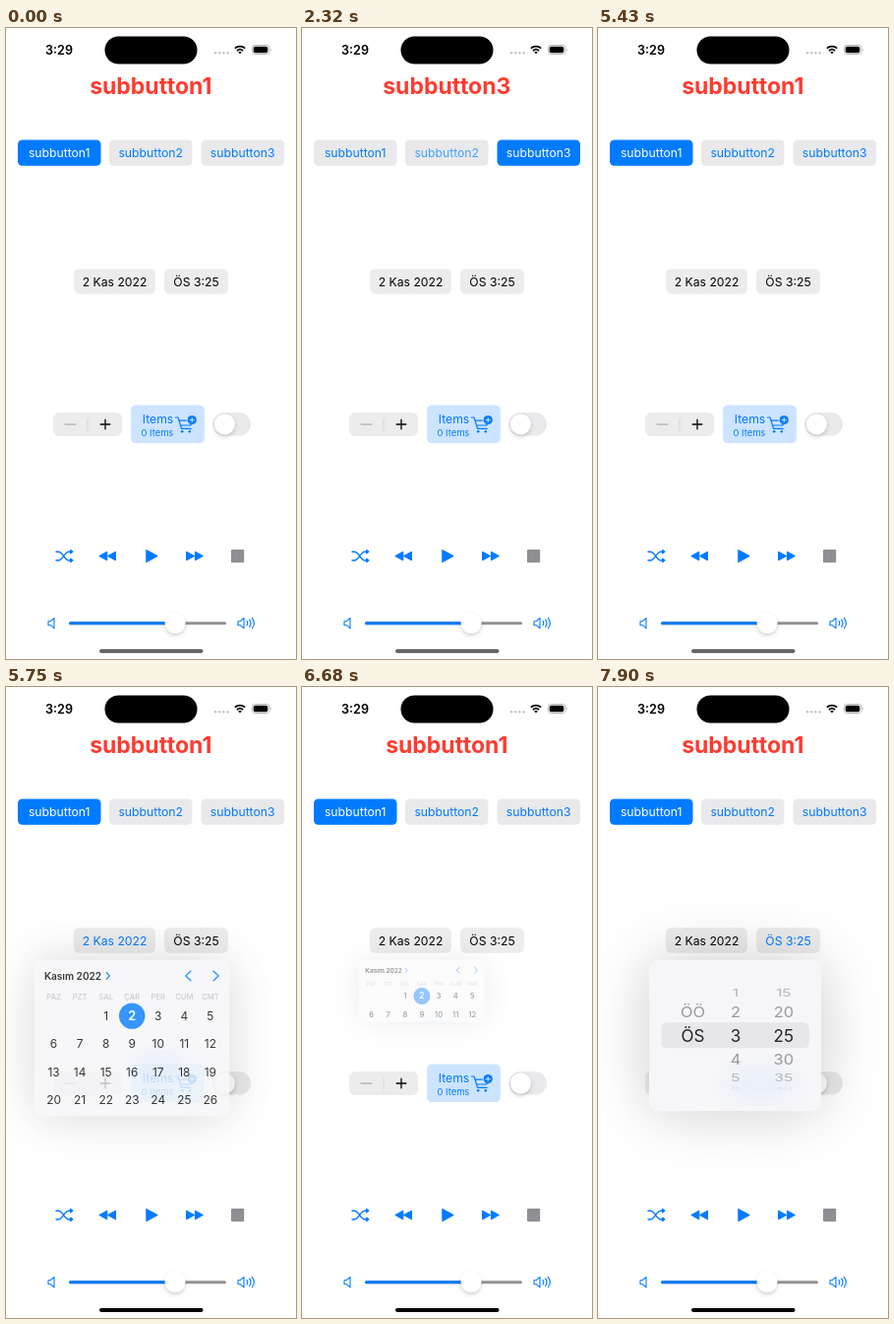
An HTML page for the animation above (8 s loop, 295x640 px).

```html
<!DOCTYPE html>
<html lang="tr">
<head>
<meta charset="utf-8">
<title>Controls</title>
<style>
html, body { margin: 0; width: 100%; height: 100%; overflow: hidden; background: #fff; }
svg { display: block; width: 100vw; height: 100vh; font-family: Inter, Roboto, sans-serif; }
</style>
</head>
<body>
<svg id="stage" viewBox="0 0 295 640"></svg>
<script>
const BLUE = '#007aff', GREY = '#e9e9eb', PILL = '#ececed', MID = '#8e8e93';
const stage = document.getElementById('stage');

// Markup helpers
const text = (x, cy, size, str, fill = '#000', weight = 400, anchor = 'middle', extra = '') =>
  `<text x="${x}" y="${(cy + size * 0.364).toFixed(2)}" font-size="${size}" fill="${fill}" ` +
  `font-weight="${weight}" text-anchor="${anchor}" ${extra}>${str}</text>`;
const rect = (x, y, w, h, r, fill, extra = '') =>
  `<rect x="${x}" y="${y}" width="${w}" height="${h}" rx="${r}" fill="${fill}" ${extra}/>`;
const line = (d, stroke, width, extra = '') =>
  `<path d="${d}" fill="none" stroke="${stroke}" stroke-width="${width}" stroke-linecap="round" stroke-linejoin="round" ${extra}/>`;
const shape = (d, fill) =>
  `<path d="${d}" fill="${fill}" stroke="${fill}" stroke-width="1" stroke-linejoin="round"/>`;
const circle = (x, y, r, fill, extra = '') =>
  `<circle cx="${x}" cy="${y}" r="${r}" fill="${fill}" ${extra}/>`;

function statusBar() {
  const dots = [213, 217.2, 221.4, 225.6].map(x => circle(x, 25.2, 1.25, '#c4c4c6')).join('');
  return text(54, 22, 12.6, '3:29', '#000', 600) + rect(100.5, 8.5, 94, 28, 14, '#000') + dots +
    line('M232.8 20.6a7.6 7.6 0 0 1 10.4 0M234.9 23a4.7 4.7 0 0 1 6.2 0', '#000', 1.7, 'style="stroke-linecap:butt"') +
    '<path d="M236.2 24.6a2.8 2.8 0 0 1 3.6 0L238 26.6z"/>' +
    rect(250.4, 17.5, 17.6, 9, 2.8, 'none', 'stroke="#a5a5a8" stroke-width=".8"') +
    rect(251.7, 18.8, 14.6, 6.4, 1.7, '#000') +
    '<path d="M269 20.4q1.6 1.6 0 3.2z" fill="#a5a5a8"/>';
}

function tabs() {
  return [12, 105, 198.5].map((x, i) =>
    rect(x, 113.5, 84.5, 26.3, 4.5, GREY, `id="tab${i}"`) +
    text(x + 42.2, 127, 12.2, 'subbutton' + (i + 1), BLUE, 400, 'middle', `id="lab${i}"`)).join('');
}

function middleRow() {
  const cart = line('M172.5 395h2.6l3.4 11.3h9.7M176.2 398.2h7M177.6 403h10.2l1-2.6', BLUE, 1.2) +
    circle(179.2, 409.3, 1.3, BLUE) + circle(186.8, 409.3, 1.3, BLUE) +
    circle(189.2, 397.6, 4.6, BLUE) + line('M186.9 397.6h4.6M189.2 395.3v4.6', '#cce4ff', 1);
  return rect(48, 390, 70.3, 24, 6, PILL) +
    line('M60 402h11', '#9b9b9e', 1.2) + line('M83 396v12', '#d4d4d7', 0.8) +
    line('M96.2 402h9.6M101 397.2v9.6', '#000', 1.3) +
    rect(127.2, 382.6, 74.6, 38.4, 4.5, '#cce4ff') +
    text(170.3, 396.4, 12.2, 'Items', BLUE, 400, 'end') +
    text(170.3, 410.2, 9.4, '0 Items', BLUE, 400, 'end') + cart +
    rect(210.5, 390, 38.5, 23.6, 11.8, GREY) +
    circle(222.4, 401.8, 10.4, '#fff', 'filter="url(#knob)"');
}

function player() {
  const arrow = x => `M${x} 531.2v8.8l8-4.4z`;
  const back = x => `M${x} 531.2v8.8l-8-4.4z`;
  return line('M51 531.2h2.4c4 0 6.4 8.8 10.4 8.8h3.6M51 540h2.4c4 0 6.4-8.8 10.4-8.8h3.6', BLUE, 1.4) +
    shape('M65.6 529.2v4l2.6-2zM65.6 538v4l2.6-2z', BLUE) +
    shape(back(102.8) + back(111.5), BLUE) + shape('M142.8 529.4v12.4l11.4-6.2z', BLUE) +
    shape(arrow(183.6) + arrow(192.4), BLUE) + rect(229, 529, 13.2, 13.2, 1, MID);
}

function volume() {
  const speaker = x => `M${x} 601.7h2.4l3.6-3.2v10.4l-3.6-3.2h-2.4z`;
  return line(speaker(43), BLUE, 1.1) + line(speaker(236), BLUE, 1.1) +
    line('M245 601.4q1.6 2.3 0 4.6M247.6 599.9q2.8 3.8 0 7.6M250.3 598.4q4 5.3 0 10.6', BLUE, 1.1) +
    rect(64, 602.3, 160, 3, 1.5, '#929296') + rect(64, 602.3, 108, 3, 1.5, BLUE) +
    circle(172, 603.6, 10.4, '#fff', 'filter="url(#knob)"') +
    rect(95, 630, 105.5, 4, 2, '#666', 'id="home"');
}

function calendar() {
  const colX = c => 35.6 + c * 32.1;
  let out = text(24, 296.3, 12.2, 'Kasım 2022', '#000', 600, 'start') +
    line('M100.6 292.5l3.6 3.9-3.6 3.9', BLUE, 1.7) +
    line('M204 290.6l-6 5.8 6 5.8M232.2 290.6l6 5.8-6 5.8', BLUE, 1.8);
  'PAZ PZT SAL ÇAR PER CUM CMT'.split(' ').forEach((d, c) => {
    out += text(colX(c), 321.8, 9.2, d, '#c3c3c7', 600);
  });
  out += circle(131.9, 345.5, 16, BLUE);
  for (let d = 1; d <= 30; d++) {
    const cell = d + 1, on = d === 2;
    out += text(colX(cell % 7), 345.6 + Math.floor(cell / 7) * 34.3, on ? 15.5 : 14.4, d, on ? '#fff' : '#000', on ? 600 : 400);
  }
  return out;
}

function wheel() {
  // Rows tilt away from the centre, so they flatten and fade
  const rowY = [0, 24, 43, 54], flat = [1, 0.88, 0.62, 0.25];
  const ink = ['#222226', '#98989c', '#b4b4b8', '#e4e4e8'];
  const row = (x, step, str) => {
    const n = Math.abs(step), y = 353.3 + Math.sign(step) * rowY[n];
    return `<g transform="translate(${x} ${y}) scale(${1 - n * 0.035} ${flat[n]})">` +
      text(0, 0, 17, str, ink[n]) + '</g>';
  };
  let out = rect(64.5, 340.3, 150.5, 26, 5.5, '#e7e7eb') + row(96.5, -1, 'ÖÖ') + row(96.5, 0, 'ÖS');
  for (let s = -2; s <= 3; s++) out += row(140, s, 3 + s) + row(188.8, s, 25 + 5 * s);
  return out;
}

// Popovers grow out of the pill above them
const panels = {
  cal: { pivot: 110.5, x: 12, w: 240, h: 236.5, body: calendar },
  clock: { pivot: 193.5, x: 52, w: 175, h: 153.5, body: wheel }
};
const TOP = 276.7;

function panel(id) {
  const p = panels[id];
  const box = cls => rect(p.x, TOP, p.w, p.h, 9, '#f6f6f8', `class="${cls}"`);
  return `<clipPath id="${id}Clip">${box('fit')}</clipPath><g id="${id}">` +
    rect(p.x, TOP, p.w, p.h, 9, '#000', 'class="fit" opacity=".2" filter="url(#shade)"') +
    `<g clip-path="url(#${id}Clip)">${box('fit')}` +
    '<ellipse cx="165" cy="402" rx="34" ry="16" fill="#cce4ff" opacity=".35" filter="url(#soft)"/>' +
    p.body() + '</g></g>';
}

stage.innerHTML = `<defs>
  <filter id="shade" filterUnits="userSpaceOnUse" x="-140" y="100" width="580" height="600"><feGaussianBlur stdDeviation="32"/></filter>
  <filter id="soft" x="-1" y="-2" width="3" height="5"><feGaussianBlur stdDeviation="10"/></filter>
  <filter id="knob" x="-.5" y="-.5" width="2" height="2.2"><feDropShadow dx="0" dy="2" stdDeviation="2.2" flood-opacity=".2"/></filter>
</defs>` + rect(0, 0, 295, 640, 0, '#fff') + statusBar() +
  text(147.3, 59, 23, 'subbutton1', '#ff3b30', 700, 'middle', 'id="title"') + tabs() +
  rect(69, 244.2, 83, 25.6, 5.5, PILL) + text(110.5, 257.3, 12.2, '2 Kas 2022', '#000', 400, 'middle', 'id="date"') +
  rect(161, 244.2, 65, 25.6, 5.5, PILL) + text(193.5, 257.3, 12.2, 'ÖS 3:25', '#000', 400, 'middle', 'id="time"') +
  middleRow() + player() + volume() + panel('cal') + panel('clock');

const el = id => document.getElementById(id);
const set = (node, name, value) => node.setAttribute(name, value);

function pose(id, p) {
  const { pivot, h } = panels[id], node = el(id);
  const s = 0.2 + 0.8 * p;
  set(node, 'display', p > 0 ? 'inline' : 'none');
  set(node, 'opacity', p);
  set(node, 'transform', `translate(${pivot} ${TOP}) scale(${s}) translate(${-pivot} ${-TOP})`);
  stage.querySelectorAll(`#${id} .fit, #${id}Clip .fit`).forEach(n => set(n, 'height', h * s ** 1.1));
}

const stepAt = (t, from, to, last) =>
  Math.min(last, Math.floor((t - from) / ((to - from) / last) + 0.05));
const opened = k => 1 - (1 - Math.max(0, (k - 1) / 5)) ** 3;
function closed(k) {
  const u = (k + 0.25) / 2.25;
  return 1 - u * u * (3 - 2 * u);
}

function draw(t) {
  const sel = t < 1290 ? 0 : t < 2320 ? 1 : t < 2930 ? 2 : 0;
  const fading = t >= 1290 && t < 1400 ? 0 : t >= 2320 && t < 2930 ? 1 : t >= 2930 && t < 3040 ? 2 : -1;
  el('title').textContent = 'subbutton' + (sel + 1);
  for (let i = 0; i < 3; i++) {
    set(el('tab' + i), 'fill', i === sel ? BLUE : GREY);
    set(el('lab' + i), 'fill', i === sel ? '#fff' : i === fading ? '#43a0ff' : BLUE);
  }
  const calK = stepAt(t, 5430, 6080, 6), clockK = stepAt(t, 7240, 7900, 6);
  pose('cal', t < 5430 ? 0 : t < 6570 ? opened(calK) : closed(stepAt(t, 6570, 6800, 2)));
  pose('clock', t < 7240 ? 0 : opened(clockK));
  set(el('date'), 'fill', calK >= 1 && t < 6680 ? BLUE : '#000');
  set(el('time'), 'fill', clockK >= 1 ? BLUE : '#000');
  set(el('home'), 'fill', t < 5750 ? '#666' : '#000');
}

const start = performance.now();
function tick() {
  draw((performance.now() - start) % 8000);
  requestAnimationFrame(tick);
}
tick();
</script>
</body>
</html>
```
